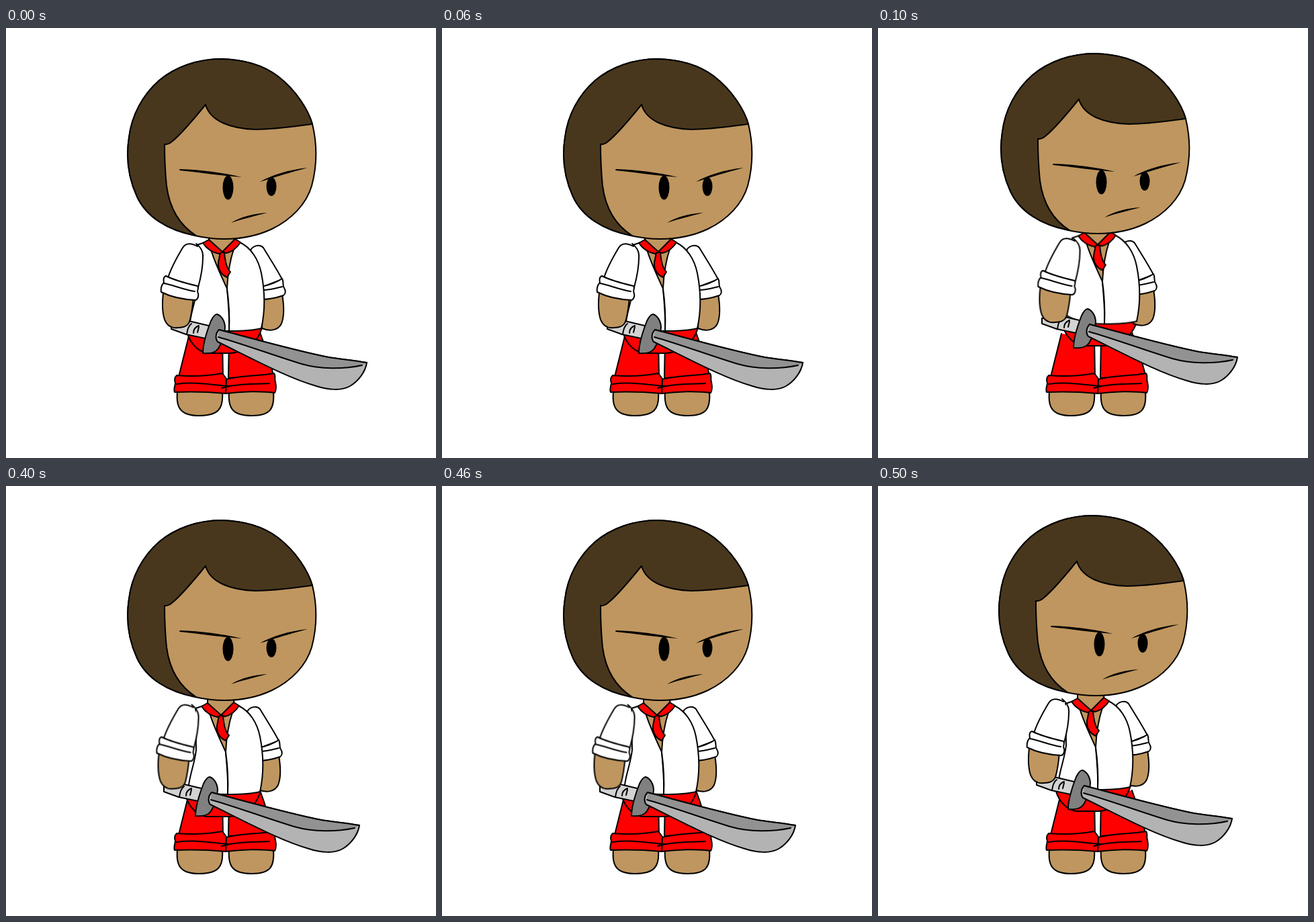
These frames come from a looping animation (640x640 px, 600 ms). An HTML page:

```html
<!DOCTYPE html>
<html lang="en">
<head>
<meta charset="utf-8">
<title>Swordsman idle</title>
<style>
  html, body { margin: 0; width: 100%; height: 100%; overflow: hidden; background: #fff; }
  svg { display: block; width: 100%; height: 100%; }
  .ink { stroke: #000; stroke-width: 2; stroke-linejoin: round; stroke-linecap: round; }
  .line { fill: none; }
  .bare { stroke: none; fill: #000; }
  .skin { fill: #bf965f; }
  .hair { fill: #49371d; }
  .red { fill: #f00; }
  .cloth { fill: #fff; }
  .steel { fill: #b3b3b3; }
  .edge { fill: #929292; }
  .guard { fill: #808080; }
  .grip { fill: #d3d3d3; }
</style>
</head>
<body>
<svg viewBox="0 0 640 640" class="ink">
  <g id="legs">
    <path class="skin" d="M255 541 C253 562 257 577 287 577 C316 577 324 567 322 541 Z"/>
    <path class="skin" d="M332 541 C330 567 338 577 366 577 C394 577 400 566 398 541 Z"/>
    <path class="red" d="M273 455 L257 519 L323 521 L322 460"/>
    <path class="red" d="M332 460 L331 521 L398 517 C393 495 387 480 384 470 L378 453"/>
    <path class="red" d="M254 517 C275 519 300 518 322 514 L328 522 L327 544 C305 542 275 541 251 542 C249 537 252 532 252 528 C250 523 252 519 254 517 Z"/>
    <path class="red" d="M328 523 C350 517 378 518 399 514 C402 518 399 523 401 527 C402 532 403 538 400 543 C380 540 350 541 327 544 Z"/>
    <path class="line" d="M254 530 C278 526 302 531 334 533 M321 536 C345 529 372 530 392 529"/>
  </g>

  <g id="pelvis">
    <path class="red" d="M268 446 C271 465 282 480 299 484 L333 484 C350 483 366 474 373 463 Q378 456 381 446"/>
  </g>

  <g id="rightArm">
    <path class="skin" d="M382 400 L411 396 C414 414 414 430 410 440 C405 450 393 452 381 447 Z"/>
    <path class="cloth" d="M364 331 C367 324 378 321 383 327 C392 342 402 357 411 374 L380 386 Z"/>
    <path class="cloth" d="M380 385 C394 382 404 378 411 373 C414 378 411 383 414 387 C417 391 416 396 413 398 C404 401 393 404 380 404 Z"/>
    <path class="line" d="M382 390 C394 390 403 387 411 385"/>
  </g>

  <g id="torso">
    <path class="skin" stroke="none" d="M302 308 L342 308 L342 335 L329 390 L302 335 Z"/>
    <path class="cloth" d="M284 323 L296 319 L306 333 C312 352 321 370 329 388 C331 410 333 430 332 451 C310 451 288 447 274 437 C276 420 283 404 285 385 Z"/>
    <path class="cloth" d="M348 319 C365 327 376 345 380 365 C385 390 386 420 380 447 C368 450 350 451 332 451 C333 430 332 410 329 388 C330 367 332 350 339 329 Z"/>
    <path class="red" d="M319 334 L325 334 C326 346 328 358 334 363 L329 371 C319 367 315 357 316 349 Z"/>
    <path class="red" d="M293 320 L302 315 L322 333 L317 336 C307 334 299 329 293 320 Z"/>
    <path class="red" d="M349 319 L341 314 L322 333 L328 335 C336 333 344 327 349 319 Z"/>
    <path class="line" d="M302 315 L302 308 M341 314 L342 308"/>
  </g>

  <g id="sword">
    <path class="grip" d="M246 440 L272 436 L310 445 L306 464 L268 456 L246 448 Z"/>
    <path class="line" d="M276 440 C272 443 270 448 269 456 M287 443 C282 445 279 449 279 454 M287 445 L285 453"/>
    <path class="guard" d="M314 426 C321 428 326 437 326 446 C325 458 321 469 316 477 C311 484 302 485 293 484 C293 472 298 454 305 436 C308 430 311 426 314 426 Z"/>
    <path class="steel" d="M317 449 C370 463 430 480 480 490 C500 493 520 495 537 498 C535 512 524 526 512 533 C500 540 480 539 462 533 C420 521 370 494 315 467 C311 462 312 454 317 449 Z"/>
    <path class="edge" d="M317 449 C370 463 430 480 480 490 C500 493 520 495 537 498 L530 502 C502 508 468 508 440 500 C400 488 355 471 316 460 Z" stroke="none"/>
    <path class="line" d="M316 460 C355 471 400 488 440 500 C468 508 502 508 530 502"/>
    <path class="line" d="M317 449 C370 463 430 480 480 490 C500 493 520 495 537 498"/>
  </g>

  <g id="leftArm">
    <path class="skin" d="M234 394 C232 412 233 425 236 434 C240 444 248 447 256 446 C266 446 272 443 274 434 C277 422 278 412 279 402 Z"/>
    <path class="cloth" stroke="none" d="M285 325 C276 320 268 319 263 327 C254 342 246 356 241 372 L285 387 C290 371 294 352 293 338 Z"/>
    <path class="line" d="M285 325 C276 320 268 319 263 327 C254 342 246 356 241 372 M283 321 C291 327 294 333 293 342 C293 355 290 371 286 386"/>
    <path class="cloth" d="M238 369 C252 376 268 380 285 384 C288 388 283 391 286 395 C287 400 285 404 282 405 C262 404 243 399 231 393 C230 387 232 382 235 379 C234 374 235 370 238 369 Z"/>
    <path class="line" d="M235 380 C250 383 266 390 281 392"/>
  </g>

  <g id="head">
    <path class="skin" d="M321 46 C358 47 384 56 405 72 C432 93 450 122 456 143 C463 172 463 205 455 235 C447 262 425 285 396 299 C375 309 350 314 325 314 C305 314 290 311 281 309 C240 301 209 281 195 251 C183 225 178 195 183 163 C187 130 203 100 228 78 C252 58 285 46 321 46 Z"/>
    <path class="hair" d="M321 46 C358 47 384 56 405 72 C432 93 450 122 456 143 C425 147 400 151 372 151 C335 150 304 139 297 114 C280 135 262 157 247 169 Q241 174 236 173 C236 195 237 215 239 235 C243 265 256 292 283 309 C240 301 209 281 195 251 C183 225 178 195 183 163 C187 130 203 100 228 78 C252 58 285 46 321 46 Z"/>
    <g class="bare">
      <path d="M259 210 C290 211 322 215 351 222 C320 220 290 215 259 212 Q257 211 259 210 Z"/>
      <path d="M378 229 C395 219 420 211 449 208 C422 215 400 222 378 229 Z"/>
      <ellipse cx="330.5" cy="237.500" rx="8" ry="18"/>
      <ellipse cx="395" cy="236" rx="7.500" ry="14"/>
      <path d="M335 290 C349 281 370 276 389 275 C370 280 352 284 335 290 Z"/>
    </g>
  </g>
</svg>
<script>
  const LOOP = 600;
  const times = [0, 100, 400, 500];
  // [x, y] shift of each part at each time
  const poses = {
    pelvis:   [[0, 0], [5, -11], [-2, 8], [-5, 0]],
    torso:    [[0, 0], [5, -10.5], [-2, 8], [-5, 1]],
    rightArm: [[0, 0], [-1, -7], [-5, 5], [-10, -3]],
    leftArm:  [[0, 0], [7.5, -8], [-6.5, 4.5], [-9, -4]],
    sword:    [[0, 0], [-2, -8], [-11, 7], [-10, -3]],
    head:     [[0, 0], [2, -8], [0, 5], [-1, -2]]
  };

  for (const [id, shifts] of Object.entries(poses)) {
    const steps = shifts.map(([x, y], i) => ({
      offset: times[i] / LOOP,
      transform: `translate(${x}px, ${y}px)`,
      easing: 'step-end'
    }));
    steps.push({ ...steps[steps.length - 1], offset: 1 });
    document.getElementById(id).animate(steps, { duration: LOOP, iterations: Infinity });
  }
</script>
</body>
</html>
```
